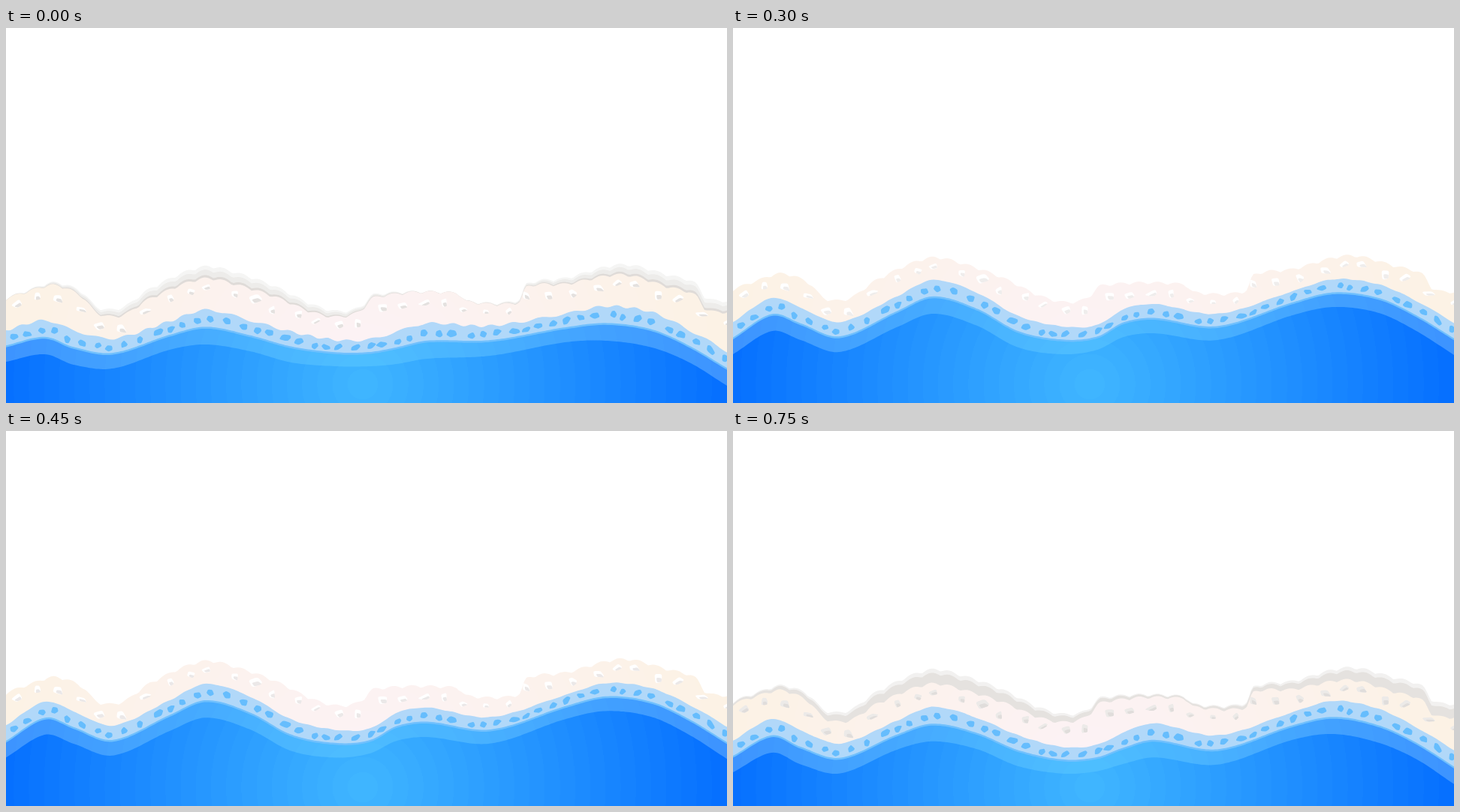
These frames come from a looping animation (960x500 px, 900 ms). An HTML page:

```html
<!DOCTYPE html>
<html lang="en">
<head>
<meta charset="utf-8">
<title>Shore waves</title>
<style>
html, body { margin: 0; width: 100%; height: 100%; overflow: hidden; background: #fff; }
svg { display: block; width: 960px; height: 500px; }
</style>
</head>
<body>
<svg id="stage" viewBox="0 0 960 500"></svg>
<script>
const W = 960, H = 500, STEP = 150;
const stage = document.getElementById('stage');

const rnd = n => { const v = Math.sin(n * 12.9898) * 43758.5453; return v - Math.floor(v); };
const lerp = (a, b, t) => a + (b - a) * t;

// Smooth function through [x, y] points
function curve(pts) {
  const last = pts.length - 1;
  const slope = i => {
    const [ax, ay] = pts[Math.max(0, i - 1)], [bx, by] = pts[Math.min(last, i + 1)];
    return (by - ay) / (bx - ax);
  };
  return x => {
    let i = 0;
    while (i < last - 1 && x > pts[i + 1][0]) i++;
    const [x0, y0] = pts[i], [x1, y1] = pts[i + 1];
    const d = x1 - x0, t = (x - x0) / d, u = 1 - t;
    return y0 * u * u * (1 + 2 * t) + y1 * t * t * (3 - 2 * t)
      + d * t * u * (slope(i) * u - slope(i + 1) * t);
  };
}

// Crests and troughs: x, rim at ebb, rim at flood, deep at ebb, deep at flood, drag of the backwash
const swell = [
  [0, 403, 392, 445, 435, 12],
  [52, 390, 360, 435, 404, 0],
  [90, 403, 373, 449, 416, 2],
  [142, 414, 392, 454, 432, 7],
  [218, 391, 358, 429, 399, 2],
  [266, 376, 336, 422, 381, 0],
  [325, 390, 353, 431, 397, 0],
  [380, 405, 384, 446, 426, 5],
  [440, 416, 398, 451, 435, 9],
  [485, 415, 396, 451, 429, 7],
  [520, 405, 375, 448, 412, 3],
  [560, 394, 368, 441, 407, 1],
  [645, 397, 381, 437, 416, 12],
  [745, 381, 351, 419, 383, 0],
  [800, 371, 335, 417, 372, -4],
  [860, 379, 342, 426, 380, -1],
  [910, 403, 364, 446, 404, 0],
  [960, 431, 393, 477, 436, 2]];

const coast = curve([
  [0, 349], [33, 337], [65, 328], [100, 340], [122, 361], [155, 361], [192, 336], [262, 307],
  [310, 316], [360, 334], [405, 356], [440, 366], [471, 361], [490, 344], [600, 342], [614, 353],
  [683, 351], [693, 330], [745, 322], [820, 304], [882, 318], [918, 329], [932, 348], [960, 353]]);
const shore = x => coast(x) + 2 - 4 * Math.abs(Math.sin(x / 8));

// flood: 0 ebb to 1 flood; wash: foam drop; swing: its unevenness; wet: sand marks from high water (0) to foam (1)
const poses = [
  { flood: 0, drag: 0, rough: 1.6, wash: 20, swing: 8, gap: '#fff', shade: '#e4e1df',
    wet: [['#f5f5f4', 0], ['#edecea', .35], ['#dfdbd8', .8]] },
  { flood: .8, drag: 0, rough: 1.6, wash: -1.5, swing: 2, gap: '#fff', wet: [] },
  { flood: 1, drag: 0, rough: .5, wash: 0, swing: 0, gap: '#fff', shade: '#efedec', wet: [] },
  { flood: .97, drag: 0, rough: .5, wash: .7, swing: 0, gap: '#fff', shade: '#ebe8e8', wet: [] },
  { flood: .5, drag: 1, rough: .5, wash: 16.5, swing: 2, gap: '#dfdbd8', wet: [['#dfdbd8', 0]] },
  { flood: .2, drag: 1, rough: .5, wash: 23, swing: 8, gap: '#eceae8', shade: '#e0dddb',
    wet: [['#f2f1f0', 0], ['#e5e2df', .3]] }
];

function area(f, fill) {
  let d = `M0 ${H}`;
  for (let x = 0; x <= W; x += 3) d += `L${x} ${f(x).toFixed(1)}`;
  return `<path d="${d}L${W} ${H}Z" fill="${fill}"/>`;
}

// Pebble with n softened corners
function blob(cx, cy, w, h, n, seed, tilt) {
  const c = Math.cos(tilt), s = Math.sin(tilt);
  const pts = Array.from({ length: n }, (_, i) => {
    const a = (i + rnd(seed + i * 7) * .6) / n * 2 * Math.PI, r = .52 + rnd(seed * 3 + i) * .2;
    const x = Math.cos(a) * w * r, y = Math.sin(a) * h * r;
    return [cx + x * c - y * s, cy + x * s + y * c];
  });
  const toward = (p, q, t) => p.map((v, k) => lerp(v, q[k], t).toFixed(1)).join(' ');
  return pts.map((p, i) => {
    const prev = pts[(i + n - 1) % n], next = pts[(i + 1) % n];
    return `${i ? 'L' : 'M'}${toward(p, prev, .28)}Q${toward(p, p, 0)} ${toward(p, next, .28)}`;
  }).join('') + 'Z';
}

const shape = (d, fill) => `<path d="${d}" fill="${fill}"/>`;

function foam(p) {
  const wash = x => p.wash + p.swing * Math.cos((x - 280) / 99);
  let out = '';
  for (const [fill, t] of p.wet) out += area(x => shore(x) + lerp(12, wash(x), t), fill);
  out += area(x => shore(x) + wash(x), 'url(#foam)');

  let gaps = '', shades = '';
  for (let i = 0; i < 34; i++) {
    const x = 8 + i * 28.5 + rnd(i + 3) * 12, y = shore(x) + wash(x) + 11 + rnd(i + 50) * 8;
    const w = 8 + rnd(i + 90) * 8, h = 6 + rnd(i + 130) * 6, tilt = rnd(i + 170) - .5;
    gaps += blob(x, y, w, h, 4, i + 1, tilt);
    shades += blob(x + w * .12, y + h * .2, w * .7, h * .5, 4, i + 1, tilt);
  }
  return out + shape(gaps, p.gap) + (p.shade ? shape(shades, p.shade) : '');
}

function water(p) {
  const level = (ebb, flood, drag) => lerp(ebb, flood, p.flood) + drag * p.drag;
  const crest = curve(swell.map(([x, ebb, flood, , , drag]) => [x, level(ebb, flood, drag)]));
  const deep = curve(swell.map(([x, , , ebb, flood, drag]) => [x, level(ebb, flood, drag)]));
  const mid = x => lerp(crest(x), deep(x), .54);
  const rim = x => crest(x) + p.rough * Math.sin(x / 5 + 2 * Math.sin(x / 33));

  let bubbles = '';
  for (let i = 0; i < 51; i++) {
    const x = 4 + i * 19 + rnd(i + 20) * 9, thick = mid(x) - crest(x);
    const tilt = Math.atan((mid(x + 5) - mid(x - 5)) / 10) + rnd(i + 40) - .5;
    const y = crest(x) + thick * (.4 + rnd(i + 9) * .2);
    bubbles += blob(x, y, 8 + rnd(i + 70) * 5, thick * .25 + 2, 5, i + 200, tilt);
  }
  return area(rim, '#b1d8f9') + shape(bubbles, '#66bdfd')
    + area(x => mid(x) - 2.5, '#70c0fd') + area(mid, 'url(#mid)') + area(deep, 'url(#deep)');
}

function gradient(id, inner, outer) {
  const bands = 24;
  let stops = '';
  for (let i = 0; i < bands; i++) {
    const fill = `rgb(${inner.map((v, k) => Math.round(lerp(v, outer[k], i / (bands - 1))))})`;
    for (const at of [i, i + 1]) stops += `<stop offset="${at / bands}" stop-color="${fill}"/>`;
  }
  return `<radialGradient id="${id}" gradientUnits="userSpaceOnUse" cx="475" cy="475" r="485">${stops}</radialGradient>`;
}

stage.innerHTML = '<defs>'
  + gradient('foam', [252, 242, 246], [252, 242, 229])
  + gradient('mid', [78, 192, 255], [61, 148, 255])
  + gradient('deep', [63, 181, 255], [6, 112, 255])
  + '</defs><g id="sea"></g>';
const sea = document.getElementById('sea');
const scenes = poses.map(p => foam(p) + water(p));

let shown = -1;
function update(time) {
  const i = Math.floor(time / STEP) % scenes.length;
  if (i !== shown) sea.innerHTML = scenes[shown = i];
}

const start = performance.now();
function tick() {
  update(performance.now() - start);
  requestAnimationFrame(tick);
}
tick();
</script>
</body>
</html>
```
